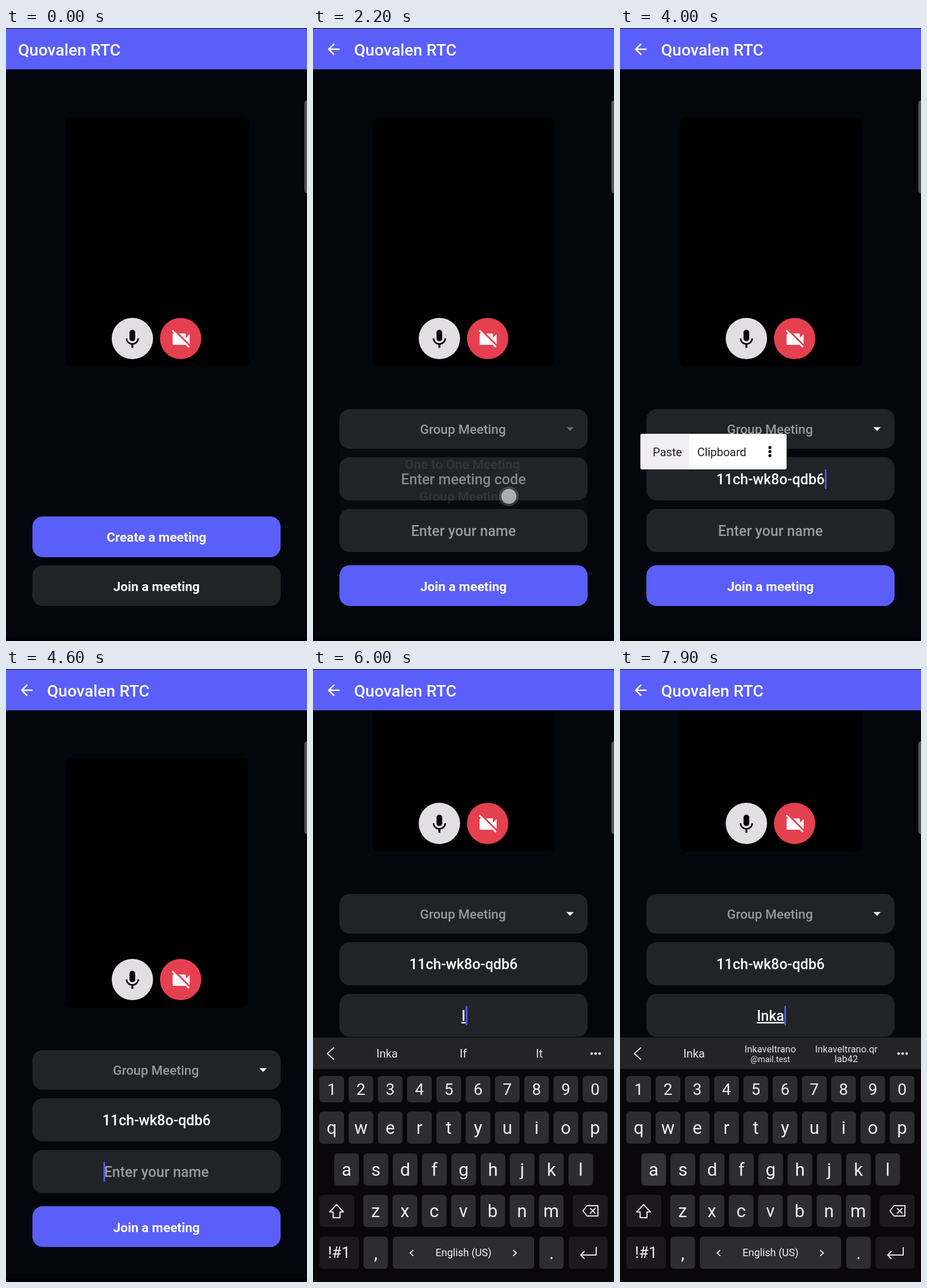
Animation of 524x1068 px, one loop 8000 ms. Source, as an HTML page:

```html
<!DOCTYPE html>
<html lang="en">
<head>
<meta charset="utf-8">
<title>Join a meeting</title>
<style>
html, body { margin: 0; width: 100%; height: 100%; overflow: hidden; background: #04060d; }
svg { display: block; width: 524px; height: 1068px; font-family: Roboto, sans-serif; }
.mid { text-anchor: middle; }
.bold { font-weight: 700; font-size: 22.6px; fill: #fff; }
.pick { font-weight: 500; font-size: 22.6px; fill: #97999c; }
.input { font-weight: 500; font-size: 25px; }
.key { font-size: 31px; fill: #f0eff1; }
.line { fill: none; stroke: #e6e5e8; stroke-width: 2; stroke-linecap: round; stroke-linejoin: round; }
</style>
</head>
<body>
<svg viewBox="0 0 524 1068">
  <rect width="524" height="1068" fill="#04060d"/>
  <g id="page">
    <rect id="card" x="104" y="156" width="317" height="434" rx="11"/>
    <circle cx="220" cy="541" r="36" fill="#e2dfe3"/>
    <path transform="translate(200.2 522.5) scale(1.65)" d="M12 14c1.66 0 3-1.34 3-3V5c0-1.66-1.34-3-3-3S9 3.34 9 5v6c0 1.66 1.34 3 3 3zm5.3-3c0 3-2.54 5.1-5.3 5.1S6.7 14 6.7 11H5c0 3.41 2.72 6.23 6 6.72V21h2v-3.28c3.28-.48 6-3.3 6-6.72z"/>
    <circle cx="304" cy="541" r="36" fill="#e54050"/>
    <path transform="translate(285.2 522.5) scale(1.64)" fill="#fff" d="M21 6.5l-4 4V7c0-.55-.45-1-1-1H9.82L21 17.18zM3.27 2L2 3.27 4.73 6H4c-.55 0-1 .45-1 1v10c0 .55.45 1 1 1h12c.21 0 .39-.08.54-.18L19.73 21 21 19.73z"/>
    <g id="home">
      <rect x="46" y="851" width="432" height="71" rx="18" fill="#5a5ffa"/>
      <text class="mid bold" x="262" y="895">Create a meeting</text>
      <rect id="joinHome" x="46" y="936" width="432" height="71" rx="18" fill="#222327"/>
      <text class="mid bold" x="262" y="981">Join a meeting</text>
    </g>
    <g id="form">
      <g fill="#202428">
        <rect x="46" y="664" width="432" height="69" rx="18"/>
        <rect x="46" y="748" width="432" height="75" rx="18"/>
        <rect x="46" y="838" width="432" height="75" rx="18"/>
      </g>
      <text id="type" class="mid pick" x="261" y="707"></text>
      <path id="arrow" d="M441 695.5h13l-6.5 6.5z" fill="#fff"/>
      <text id="code" class="mid input" x="262" y="795"></text>
      <text id="name" class="mid input" x="262" y="885"></text>
      <rect id="caret" width="2.6" height="34" fill="#5a5ffa"/>
      <rect x="46" y="936" width="432" height="71" rx="18" fill="#5a5ffa"/>
      <text class="mid bold" x="262" y="981">Join a meeting</text>
      <g id="list">
        <rect x="47" y="733" width="430" height="113" fill="#202428"/>
        <path d="M65 786.5H461" stroke="#3b3f43"/>
        <text class="mid pick" x="260" y="768">One to One Meeting</text>
        <text class="mid pick" x="260" y="824">Group Meeting</text>
      </g>
      <g id="menu" font-size="20">
        <rect x="35.5" y="707" width="254.5" height="62" rx="3" fill="#fff"/>
        <rect id="paste" x="36" y="707" width="84.5" height="62" rx="3" fill="#f1eff2"/>
        <text x="57" y="746" fill="#222">Paste</text>
        <text x="134.5" y="746" fill="#222">Clipboard</text>
        <path d="M261 731v0M261 738v0M261 745v0" stroke="#111" stroke-width="5.4" stroke-linecap="round"/>
      </g>
    </g>
  </g>
  <path d="M0 1062H524V1068H0z"/>
  <g id="board">
    <rect y="642" width="524" height="450" fill="#09070b"/>
    <rect y="642" width="524" height="55" fill="#242326"/>
    <g id="tools"></g>
    <g id="words" fill="#e3e2e5">
      <path class="line" d="M36 660l-11 10 11 10"/>
      <g id="sugg"></g>
    </g>
    <path d="M485 670v0M492 670v0M499 670v0" stroke="#eee" stroke-width="4.4" stroke-linecap="round"/>
    <g id="keys"></g>
  </g>
  <rect width="524" height="72" fill="#5a5ffa"/>
  <path d="M0 0H524V1H0z" fill="#0a0b18"/>
  <path id="back" transform="translate(20.4 21.4) scale(1.3)" fill="#fff" d="M20 11H7.83l5.59-5.59L12 4l-8 8 8 8 1.41-1.41L7.83 13H20z"/>
  <text id="title" y="48" font-size="28.4" font-weight="500" fill="#fff">Quovalen RTC</text>
  <rect x="519.5" y="126" width="12" height="162" rx="5" fill="#57585d"/>
  <g id="dot">
    <circle r="17" fill="#9a9ab0" opacity=".3"/>
    <circle r="13" fill="#b4b4b8" opacity=".93"/>
  </g>
</svg>
<script>
const LOOP = 8000, STEP = 100;
const $ = id => document.getElementById(id);
const clamp = v => Math.max(0, Math.min(1, v));
const show = (id, on) => $(id).setAttribute('opacity', Number(on));

function add(parent, tag, attrs, text) {
  const el = document.createElementNS('http://www.w3.org/2000/svg', tag);
  for (const k in attrs) el.setAttribute(k, attrs[k]);
  if (text) el.textContent = text;
  parent.appendChild(el);
  return el;
}

// Keyboard
const keys = {}, letters = [];
function key(id, x, y, w, h, fill = '#2d2c30', size = 31, label = id) {
  const box = add($('keys'), 'rect', { x, y, width: w, height: h, rx: 6, fill });
  const lit = add($('keys'), 'rect', { x, y, width: w, height: h, rx: 6, fill: '#77767c', opacity: 0 });
  keys[id] = { box, lit };
  return add($('keys'), 'text',
    { class: 'mid key', x: x + w / 2, y: y + h / 2 + size * .34, 'font-size': size, style: `font-size:${size}px` }, label);
}
function row(chars, x, y, h, size) {
  [...chars].forEach((c, i) => {
    const text = key(c, x + i * 50.95, y, 43, h, undefined, size);
    if (/[a-z]/.test(c)) letters.push([text, c]);
  });
}
const DARK = '#1b191d';
row('1234567890', 11, 709, 46, 28);
row('qwertyuiop', 11, 771, 56, 31);
row('asdfghjkl', 37, 844, 56, 31);
row('zxcvbnm', 87.5, 916, 56, 31);
key('shift', 11, 916, 61, 56, DARK, 31, '');
key('del', 452, 916, 61, 56, DARK, 31, '');
key('!#1', 11, 989, 69, 56, DARK, 27);
key(',', 88, 989, 42.5, 56);
key('space', 139, 989, 246, 56, undefined, 18, 'English (US)');
key('.', 394, 989, 42.5, 56);
key('enter', 445, 989, 68, 56, DARK, 31, '');
const icon = (parent, d, x = 0, y = 0) =>
  add($(parent), 'path', { class: 'line', d, transform: `translate(${x} ${y})` });
const shiftIcon = icon('keys', 'M0-12L12 1H6V11H-6V1H-12z', 41, 945);
icon('keys', 'M-13 0L-6-9H13V9H-6zM0-4l8 8M8-4l-8 8', 483, 944);
icon('keys', 'M14-9V4H-13M-7-2l-6 6 6 6', 479, 1017);
icon('keys', 'M174 1013l-5 4.5 5 4.5M349 1013l5 4.5-5 4.5');

// Toolbar
const ring = r => `M${-r} 0a${r} ${r} 0 1 0 ${2 * r} 0a${r} ${r} 0 1 0 ${-2 * r} 0`;
let gear = '';
for (let i = 0; i < 48; i++) {
  const a = i * Math.PI / 24, r = 9.4 + 1.2 * Math.cos(6 * a);
  gear += (i ? 'L' : 'M') + (r * Math.cos(a)).toFixed(1) + ' ' + (r * Math.sin(a)).toFixed(1);
}
[
  ring(10) + 'M-5 3q5 6 10 0M-4-3v0M4-3v0',
  'M-3-7a3 3 0 0 1 6 0V0a3 3 0 0 1-6 0zM-7-1a7 7 0 0 0 14 0M0 6v4',
  gear + 'z' + ring(3),
  'M-10-2l4-9 4 9M-9-5h6M2-8h6v5M-8 3v5h6M3 6a3.5 3.5 0 1 0 7 0a3.5 3.5 0 1 0-7 0',
  'M-9-2a7 7 0 1 0 14 0a7 7 0 1 0-14 0M3 3l6 6',
  'M-4 4h-4q-2 0-2-2v-10q0-2 2-2h8q2 0 2 2M-1-4h9q2 0 2 2v10q0 2-2 2h-9q-2 0-2-2v-10q0-2 2-2M1 6l3-8 3 8M2 3h4M-7-5h3M-9 7v3h3'
].forEach((d, i) => {
  const x = 38 + i * 76.8, off = i === 3;
  add($('tools'), 'circle', { cx: x, cy: 669, r: 20, fill: off ? '#39383b' : '#49484c' });
  const p = icon('tools', d, x, 669);
  if (off) p.style.stroke = '#69686c';
});

// Timeline
const SHIFT = [5500, 5800];
const taps = [
  [200, 500, 320, 972], [1100, 1400, 373, 694], [2000, 2300, 341, 816],
  [2700, 3300, 270, 787], [3700, 3900, 82, 738], [4400, 4600, 300, 877],
  [5400, 5500, 41, 945, 'shift'], [5700, 5800, 389, 800, 'i'],
  [6500, 6700, 364, 945, 'n'], [7000, 7200, 415, 872, 'k'], [7600, 7800, 58, 872, 'a']
];
const typed = [[5800, 'I'], [6600, 'In'], [7100, 'Ink'], [7700, 'Inka']];
const suggestions = {
  I: ['Inka', 'If', 'It'],
  In: ['In', 'Inka', 'Into'],
  Ink: ['Ink', 'Inka', 'Inks'],
  Inka: ['Inka', 'Inkaveltrano|@mail.test', 'Inkaveltrano.qr|lab42']
};

let shown = '';
function suggest(word) {
  if (word === shown) return;
  shown = word;
  $('sugg').textContent = '';
  (suggestions[word] || []).forEach((s, i) => {
    const x = 129 + i * 132.5, [a, b] = s.split('|');
    add($('sugg'), 'text', { class: 'mid', x, y: b ? 668 : 677, 'font-size': b ? 16.5 : 20 }, a);
    if (b) add($('sugg'), 'text', { class: 'mid', x, y: 685, 'font-size': i === 1 ? 14.5 : 16.5 }, b);
  });
}

function field(id, value, hint) {
  const el = $(id);
  el.textContent = value || hint;
  el.setAttribute('fill', value ? '#fff' : '#97999c');
}
function caret(id, value, y, on) {
  const half = $(id).getComputedTextLength() / 2;
  const x = 262 + (value ? half + .5 : -half - 1);
  $('caret').setAttribute('x', x);
  $('caret').setAttribute('y', y);
  show('caret', on);
}

function draw(t) {
  const joined = t >= 600, board = t >= 4600, up = t >= 4700;
  show('home', !joined);
  show('form', joined);
  show('back', joined);
  $('title').setAttribute('x', joined ? 71.5 : 21);
  $('card').setAttribute('width', joined ? 317 : 320);
  $('joinHome').setAttribute('fill', t >= 300 && t < 600 ? '#34353a' : '#222327');
  $('page').setAttribute('transform', `translate(0 ${up ? -272 : 0})`);

  // Meeting type list
  const list = t < 1400 ? 0 : t < 2100 ? clamp((t - 1300) / 200) : clamp((2230 - t) / 200);
  show('list', list);
  $('type').textContent = t < 2100 ? 'Choose Meeting Type' : 'Group Meeting';
  $('arrow').setAttribute('fill', t >= 1400 && t < 2300 ? '#686b6f' : '#fff');

  // Inputs
  const code = t >= 3900 ? '11ch-wk8o-qdb6' : '';
  const last = typed.filter(e => t >= e[0]).pop();
  const name = last ? last[1] : '';
  field('code', code, 'Enter meeting code');
  field('name', name, 'Enter your name');
  $('name').setAttribute('text-decoration', name ? 'underline' : 'none');
  const blink = from => Math.floor((t - from) / 500) % 2 === 0;
  if (board) caret('name', name, 859, blink(last ? last[0] : 4600));
  else caret('code', code, 769, t >= 2800 && blink(code ? 3900 : 2800));
  show('menu', t < 3200 ? 0 : Math.min(clamp((t - 3100) / 200), clamp((4300 - t) / 200)));
  show('paste', t >= 3700);

  // Keyboard
  const rest = (1 - clamp((t - 4600) / 308)) ** 3;
  $('board').setAttribute('transform', `translate(0 ${(426 * rest).toFixed(2)})`);
  show('board', board);
  show('tools', !name);
  show('words', !!name);
  suggest(name);
  const caps = t >= SHIFT[0] && t < SHIFT[1];
  for (const [el, c] of letters) el.textContent = caps ? c.toUpperCase() : c;
  shiftIcon.style.fill = caps ? '#e6e5e8' : 'none';

  // Touches
  let dot = null;
  for (const k in keys) keys[k].lit.setAttribute('opacity', 0);
  for (const tap of taps) {
    const [from, to, x, y, k] = tap;
    if (t >= from && t < to) dot = [x, y];
    if (k && t >= from) keys[k].lit.setAttribute('opacity', .4 * clamp((to + 150 - t) / 200));
  }
  show('dot', !!dot);
  if (dot) $('dot').setAttribute('transform', `translate(${dot})`);
}

const start = performance.now();
function tick() {
  const t = (performance.now() - start) % LOOP;
  draw(Math.floor(t / STEP) * STEP);
  requestAnimationFrame(tick);
}
tick();
</script>
</body>
</html>
```
